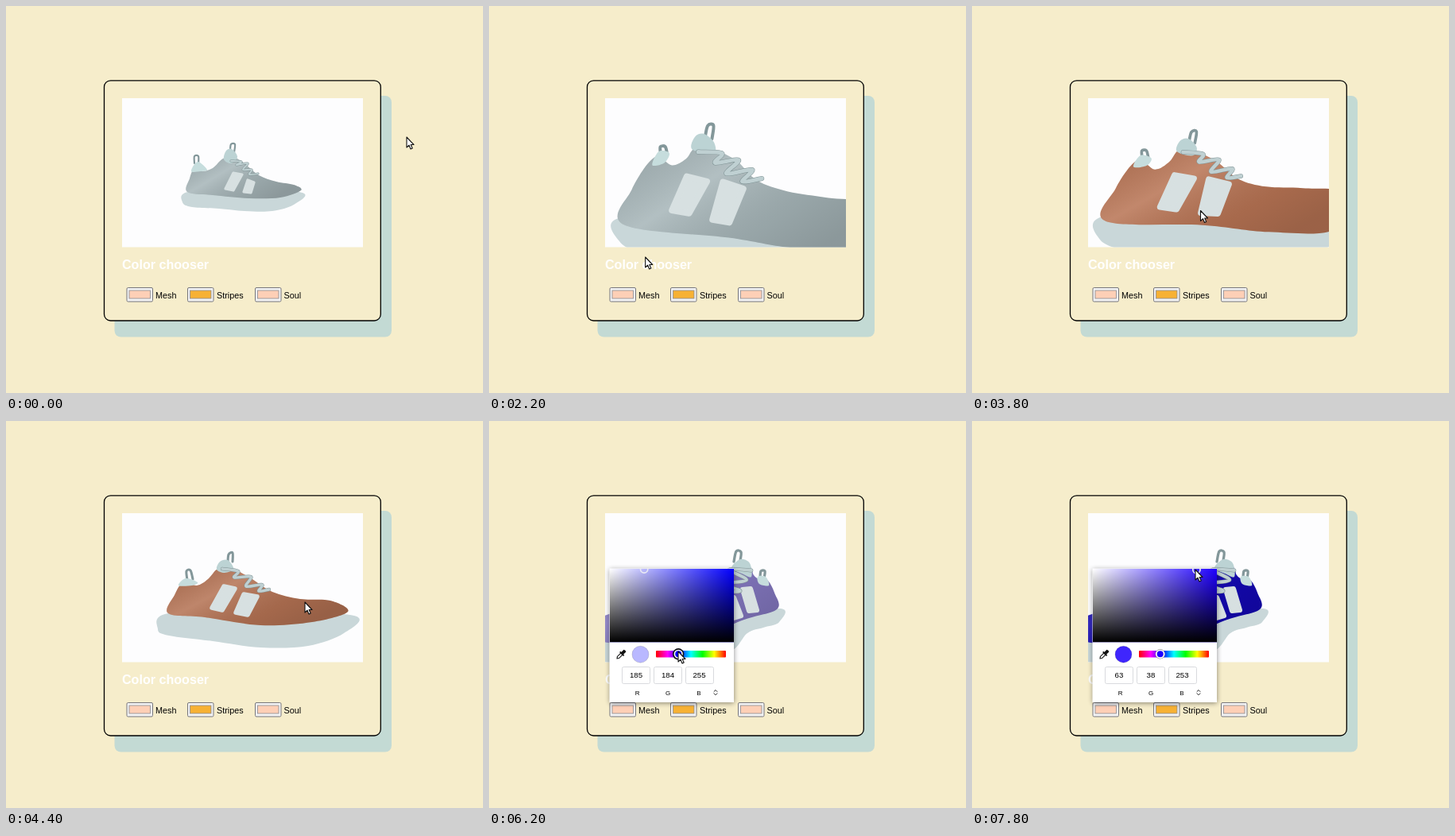
An HTML page for the animation above (8 s loop, 600 px wide and 487 px high).

```html
<!DOCTYPE html>
<html lang="en">
<head>
<meta charset="utf-8">
<title>Color chooser</title>
<style>
  html, body { margin: 0; width: 100%; height: 100%; overflow: hidden; background: #f6edcb; }
  svg { display: block; width: 600px; height: 487px; }
  text { font-family: "Liberation Sans", Arial, sans-serif; font-size: 10.8px; }
  .title { font-size: 16.1px; font-weight: bold; fill: #fff; }
  .well rect:first-child { fill: #f3f3f4; stroke: #77777c; }
  .well rect + rect { stroke: #8b8b90; stroke-width: .8; }
  .field { fill: #fff; stroke: #d9dade; }
  .value { font-size: 9.7px; text-anchor: middle; }
  .channel { font-size: 8px; text-anchor: middle; }
  .line { fill: none; stroke-linecap: round; stroke-linejoin: round; }
  .stripe { fill: #d7e0e1; stroke: #d7e0e1; stroke-linejoin: round; }
</style>
</head>
<body>
<svg viewBox="0 0 600 487">
  <defs>
    <clipPath id="viewer"><rect x="146" y="116" width="303" height="187.500"/></clipPath>
    <clipPath id="field"><rect x="152" y="186" width="156" height="92.500"/></clipPath>
    <filter id="blur" x="-20%" y="-20%" width="140%" height="140%"><feGaussianBlur stdDeviation="3"/></filter>
    <linearGradient id="shade" x2="1" y2=".6">
      <stop offset="0" stop-opacity=".1"/>
      <stop offset=".4" stop-color="#fff" stop-opacity=".14"/>
      <stop offset=".75" stop-opacity=".09"/>
      <stop offset="1" stop-opacity=".16"/>
    </linearGradient>
    <linearGradient id="white"><stop stop-color="#fff"/><stop offset="1" stop-color="#fff" stop-opacity="0"/></linearGradient>
    <linearGradient id="black" x2="0" y2="1"><stop stop-opacity="0"/><stop offset="1"/></linearGradient>
    <linearGradient id="rainbow">
      <stop stop-color="#f00"/><stop offset=".167" stop-color="#f0f"/>
      <stop offset=".333" stop-color="#00f"/><stop offset=".5" stop-color="#0ff"/>
      <stop offset=".667" stop-color="#0f0"/><stop offset=".833" stop-color="#ff0"/>
      <stop offset="1" stop-color="#f00"/>
    </linearGradient>
  </defs>

  <rect width="600" height="487" fill="#f6edcb"/>
  <rect x="136.500" y="113" width="348.500" height="303.500" rx="8" fill="#c3dad4"/>
  <rect x="123.500" y="93.800" width="347.800" height="302.200" rx="8" fill="#f6edcb" stroke="#000" stroke-width="1.300"/>
  <rect x="146" y="116" width="303" height="187.500" fill="#fdfdfe"/>

  <g clip-path="url(#viewer)">
    <path id="heelLoop" class="line" stroke="#83979a"/>
    <path id="tongueLoop" class="line" stroke="#83979a"/>
    <path id="sole" fill="#c9d7d9"/>
    <path id="upper"/>
    <path id="shading" fill="url(#shade)"/>
    <path id="lining" fill="#c6dddd"/>
    <path id="tongue" fill="#bcd3d4"/>
    <path id="stripe1" class="stripe"/>
    <path id="stripe2" class="stripe"/>
    <path id="laceShadow" class="line" stroke="#7f9294"/>
    <path id="laces" class="line" stroke="#bfd0d2"/>
  </g>

  <text class="title" x="146" y="331">Color chooser</text>
  <g class="well"><rect x="152" y="354.500" width="32.500" height="17.500" rx="1.500"/><rect x="155" y="358" width="26.500" height="10" fill="#fecfb6"/></g>
  <g class="well"><rect x="228.500" y="354.500" width="32.500" height="17.500" rx="1.500"/><rect x="231.500" y="358" width="26.500" height="10" fill="#f7b134"/></g>
  <g class="well"><rect x="313.500" y="354.500" width="32.500" height="17.500" rx="1.500"/><rect x="316.500" y="358" width="26.500" height="10" fill="#fecfb6"/></g>
  <text x="188" y="368">Mesh</text>
  <text x="265" y="368">Stripes</text>
  <text x="349.500" y="368">Soul</text>

  <g id="picker">
    <rect x="152" y="187" width="156" height="168" filter="url(#blur)" opacity=".45"/>
    <rect x="151.500" y="185.500" width="156.500" height="168.500" fill="#fff"/>
    <g clip-path="url(#field)">
      <rect id="pureHue" x="152" y="186" width="156" height="92.500"/>
      <rect x="152" y="186" width="156" height="92.500" fill="url(#white)"/>
      <rect x="152" y="186" width="156" height="92.500" fill="url(#black)"/>
      <circle id="shadeHandle" r="4.600" fill="none" stroke-width="1.700"/>
    </g>
    <g transform="translate(166 294) rotate(45)">
      <path d="M-1.500-1.500V5L0 7 1.500 5V-1.500Z" fill="#fff" stroke="#111" stroke-width="1.100"/>
      <path d="M-3.500-2.500H3.500V-.8H-3.500ZM-2-7Q0-8.500 2-7V-2H-2Z" fill="#111"/>
    </g>
    <circle id="swatch" cx="190.500" cy="293.700" r="10.500" stroke="#0002"/>
    <rect x="210" y="289" width="88" height="8.500" rx="1" fill="url(#rainbow)"/>
    <circle id="hueRing" cy="293.300" r="6.300"/>
    <circle id="hueHandle" cy="293.300" r="4.800" stroke="#fff" stroke-width="1.600"/>
    <rect class="field" x="167.500" y="309.500" width="35" height="21" rx="2"/>
    <rect class="field" x="207.500" y="309.500" width="35" height="21" rx="2"/>
    <rect class="field" x="247.500" y="309.500" width="35" height="21" rx="2"/>
    <text class="value" x="185" y="323.300"></text>
    <text class="value" x="225" y="323.300"></text>
    <text class="value" x="264.500" y="323.300"></text>
    <text class="channel" x="186.700" y="345">R</text>
    <text class="channel" x="225.200" y="345">G</text>
    <text class="channel" x="264" y="345">B</text>
    <path d="M283 340.500l2-2 2 2M283 342.800l2 2 2-2" class="line" stroke="#222"/>
  </g>
  <path id="cursor" d="M0 0V13L3 10.200 5 15 7.200 14 5.200 9.500H9Z" fill="#fff" stroke="#111" stroke-width="1.100" stroke-linejoin="round"/>
</svg>

<script>
const LOOP = 8000, STEP = 200;
const $ = id => document.getElementById(id);
const values = document.querySelectorAll('.value');

// Each view of the shoe has the same parts with the same number of points.
const poses = [
  { // side
    weight: 2,
    sole: '229,234 222,247 234,253 268,255 300,258 335,258 362,250 373,235 300,230',
    upper: '228,234 231,217 237,204 247,208 260,204 273,192 286,190 300,198 318,213 340,221 362,225 371,232 345,241 305,242 260,238',
    lining: '233,208 241,196 253,206 245,208',
    tongue: '274,193 277,182 284,180 291,190 283,198',
    heelLoop: '237,198 237,189 242,189 242,199',
    tongueLoop: '282,182 283,174 288,174 287,184',
    stripe1: '286,210 297,212 286,232 276,230',
    stripe2: '304,219 312,222 308,235 299,234',
    laces: '283,195 296,196 290,200 304,198 298,206 309,206 306,212 317,211'
  },
  { // close, three-quarter
    weight: 5,
    sole: '239,230 244,250 252,270 256,310 300,330 380,330 460,330 470,300 330,270',
    upper: '248,236 238,215 240,192 250,182 258,182 268,178 290,176 318,188 345,222 400,251 455,283 470,320 400,330 320,330 268,298',
    lining: '243,201 247,184 262,181 256,194',
    tongue: '262,178 264,159 276,153 291,162 297,180',
    heelLoop: '251,181 250,170 256,169 259,180',
    tongueLoop: '279,156 280,137 288,136 290,156',
    stripe1: '264,213 270,224 258,244 251,237',
    stripe2: '284,236 291,246 263,282 258,264',
    laces: '268,186 305,186 282,203 322,201 293,219 335,214 305,237 348,225'
  },
  { // close, low side
    weight: 5,
    sole: '150,275 146,310 200,330 260,335 320,335 380,335 440,330 480,300 330,270',
    upper: '150,285 165,235 200,190 225,205 245,195 256,180 275,180 308,195 335,219 370,229 420,231 490,234 490,296 400,298 310,290',
    lining: '196,200 205,183 218,186 212,198',
    tongue: '254,181 258,166 269,163 281,174 279,187',
    heelLoop: '207,186 207,179 213,179 215,186',
    tongueLoop: '270,167 274,154 281,154 278,170',
    stripe1: '245,215 275,220 250,265 225,262',
    stripe2: '297,218 327,226 312,270 287,270',
    laces: '262,183 290,185 285,196 312,192 300,209 330,204 322,217 342,215'
  },
  { // near side
    weight: 3.4,
    sole: '204,242 191,262 205,270 260,277 320,285 380,283 425,267 438,245 320,240',
    upper: '204,242 212,219 223,203 240,207 254,199 266,186 280,184 305,196 335,215 370,224 408,226 430,240 385,253 320,257 250,247',
    lining: '217,207 226,198 241,203 234,207',
    tongue: '265,187 269,177 279,175 286,186 275,191',
    heelLoop: '228,200 227,189 232,188 235,199',
    tongueLoop: '279,178 280,168 285,166 285,177',
    stripe1: '274,208 288,211 272,238 259,235',
    stripe2: '299,218 316,221 304,244 289,241',
    laces: '272,186 292,189 287,197 308,196 302,208 322,206 318,214 331,212'
  },
  { // turned the other way
    weight: 3.8,
    sole: '371,237 374,257 345,262 318,273 285,292 225,299 160,295 110,280 250,250',
    upper: '371,238 367,220 360,205 347,207 338,200 331,185 318,178 298,190 270,216 220,227 165,233 120,255 160,268 240,274 318,250',
    lining: '362,208 353,198 341,200 346,206',
    tongue: '332,196 329,180 316,174 305,185 318,192',
    heelLoop: '352,200 353,190 348,190 346,200',
    tongueLoop: '316,176 317,165 311,164 308,177',
    stripe1: '332,212 321,212 329,238 338,238',
    stripe2: '309,224 299,225 308,248 318,245',
    laces: '326,190 300,190 315,198 287,203 305,210 277,212 290,219 268,216'
  },
  { // heel towards the viewer
    weight: 3.8,
    sole: '362,236 365,253 345,260 325,267 300,292 230,305 140,303 90,290 240,260',
    upper: '362,237 359,216 350,200 341,200 333,194 329,184 316,178 300,190 272,216 220,228 160,240 120,260 150,279 240,282 318,251',
    lining: '352,207 348,196 338,196 340,205',
    tongue: '330,196 328,179 316,174 305,185 318,192',
    heelLoop: '346,198 347,189 342,189 341,198',
    tongueLoop: '316,176 317,165 311,164 308,177',
    stripe1: '329,211 319,212 327,239 337,238',
    stripe2: '308,222 298,224 307,248 317,245',
    laces: '330,188 302,187 324,200 296,205 316,214 290,216 300,226 280,220'
  }
];
for (const pose of poses)
  for (const part in pose)
    if (part !== 'weight') pose[part] = pose[part].split(' ').map(p => p.split(',').map(Number));

// Tracks: time, then values
const poseTrack = [[400, 0], [1200, 1], [1400, 1], [2400, 2], [3600, 2], [4200, 3], [4400, 3],
  [4800, 3.25], [5000, 3.8], [5200, 4], [5600, 5]];
const cursorTrack = [[0, 504, 165], [200, 490, 215], [600, 400, 395], [1000, 270, 235], [1400, 323, 217],
  [1800, 260, 240], [2400, 165, 354], [2600, 159, 364], [3200, 159, 364], [3600, 240, 280], [4000, 335, 235],
  [4400, 376, 228], [4800, 456, 232], [5000, 430, 230], [5200, 308, 228], [5600, 159, 364], [5800, 165, 362],
  [6000, 270, 292], [6200, 238, 290], [6600, 237, 290], [7000, 196, 188], [7800, 281, 187]];
const pickTrack = [[5600, 21.1, .278, 1], [5800, 21.1, .278, 1], [6000, 150, .278, 1], [6200, 240.8, .278, 1],
  [6600, 247, .278, 1], [7000, 247, .282, 1], [7800, 247, .85, .992]];
const meshTrack = [[3200, 166, 181, 184], [3400, 186, 118, 84], [5200, 176, 111, 82], [5800, 176, 111, 82],
  [6200, 133, 121, 194], [7000, 130, 118, 194], [7800, 20, 8, 182]];

const mix = (a, b, k) => a + (b - a) * k;

function sample(track, t) {
  const next = track.findIndex(key => key[0] > t);
  if (next === 0) return track[0].slice(1);
  if (next < 0) return track.at(-1).slice(1);
  const a = track[next - 1], b = track[next], k = (t - a[0]) / (b[0] - a[0]);
  return a.slice(1).map((v, i) => mix(v, b[i + 1], k));
}

function curve(points, closed) {
  const n = points.length;
  const at = i => closed ? points[(i + n) % n] : points[Math.max(0, Math.min(n - 1, i))];
  let d = 'M' + points[0];
  for (let i = 0; i < (closed ? n : n - 1); i++) {
    const [a, b, c, e] = [at(i - 1), at(i), at(i + 1), at(i + 2)];
    const c1 = b.map((v, j) => v + (c[j] - a[j]) / 6);
    const c2 = c.map((v, j) => v - (e[j] - b[j]) / 6);
    d += `C${c1} ${c2} ${c}`;
  }
  return closed ? d + 'Z' : d;
}

function drawShoe(position, color) {
  const index = Math.min(Math.floor(position), poses.length - 2), k = position - index;
  const a = poses[index], b = poses[index + 1], weight = mix(a.weight, b.weight, k);
  const part = name => a[name].map((p, i) => p.map((v, j) => mix(v, b[name][i][j], k)));
  const set = (id, d, width) => {
    $(id).setAttribute('d', d);
    if (width) $(id).setAttribute('stroke-width', width);
  };
  for (const id of ['sole', 'upper', 'lining', 'tongue']) set(id, curve(part(id), true));
  set('shading', curve(part('upper'), true));
  for (const id of ['stripe1', 'stripe2']) set(id, 'M' + part(id).join('L') + 'Z', weight * 1.6);
  for (const id of ['heelLoop', 'tongueLoop']) set(id, curve(part(id)), 1 + weight * .6);
  const laces = curve(part('laces'));
  set('laceShadow', laces, weight + 1);
  set('laces', laces, weight);
  $('upper').setAttribute('fill', `rgb(${color})`);
}

function hsvToRgb(h, s, v) {
  return [5, 3, 1].map(n => {
    const k = (n + h / 60) % 6;
    return Math.round(255 * v * (1 - s * Math.max(0, Math.min(k, 4 - k, 1))));
  });
}

function drawPicker(t) {
  const open = t >= 2600 && t < 3800 || t >= 5600;
  $('picker').style.display = open ? '' : 'none';
  if (!open) return;
  const [h, s, v] = sample(pickTrack, t), rgb = hsvToRgb(h, s, v);
  const pure = `rgb(${hsvToRgb(h, 1, 1)})`, hueX = 296 - h * .24;
  const dragging = t >= 6000 && t < 6800;
  $('pureHue').setAttribute('fill', pure);
  $('swatch').setAttribute('fill', `rgb(${rgb})`);
  $('shadeHandle').setAttribute('cx', 152 + s * 156 - s * s * 3);
  $('shadeHandle').setAttribute('cy', 278.5 - v * 92);
  $('shadeHandle').setAttribute('stroke', t < 5800 ? '#111' : '#e9e9f4');
  $('hueRing').setAttribute('cx', hueX);
  $('hueRing').setAttribute('r', dragging ? 7.2 : 6.2);
  $('hueRing').setAttribute('fill', dragging ? '#101018' : '#999');
  $('hueHandle').setAttribute('cx', hueX);
  $('hueHandle').setAttribute('fill', pure);
  values.forEach((el, i) => el.textContent = rgb[i]);
}

function frame(now) {
  const t = Math.floor(now % LOOP / STEP) * STEP;
  drawShoe(sample(poseTrack, t)[0], sample(meshTrack, t));
  drawPicker(t);
  $('cursor').setAttribute('transform', `translate(${sample(cursorTrack, t)})`);
  requestAnimationFrame(frame);
}
frame(performance.now());
</script>
</body>
</html>
```
